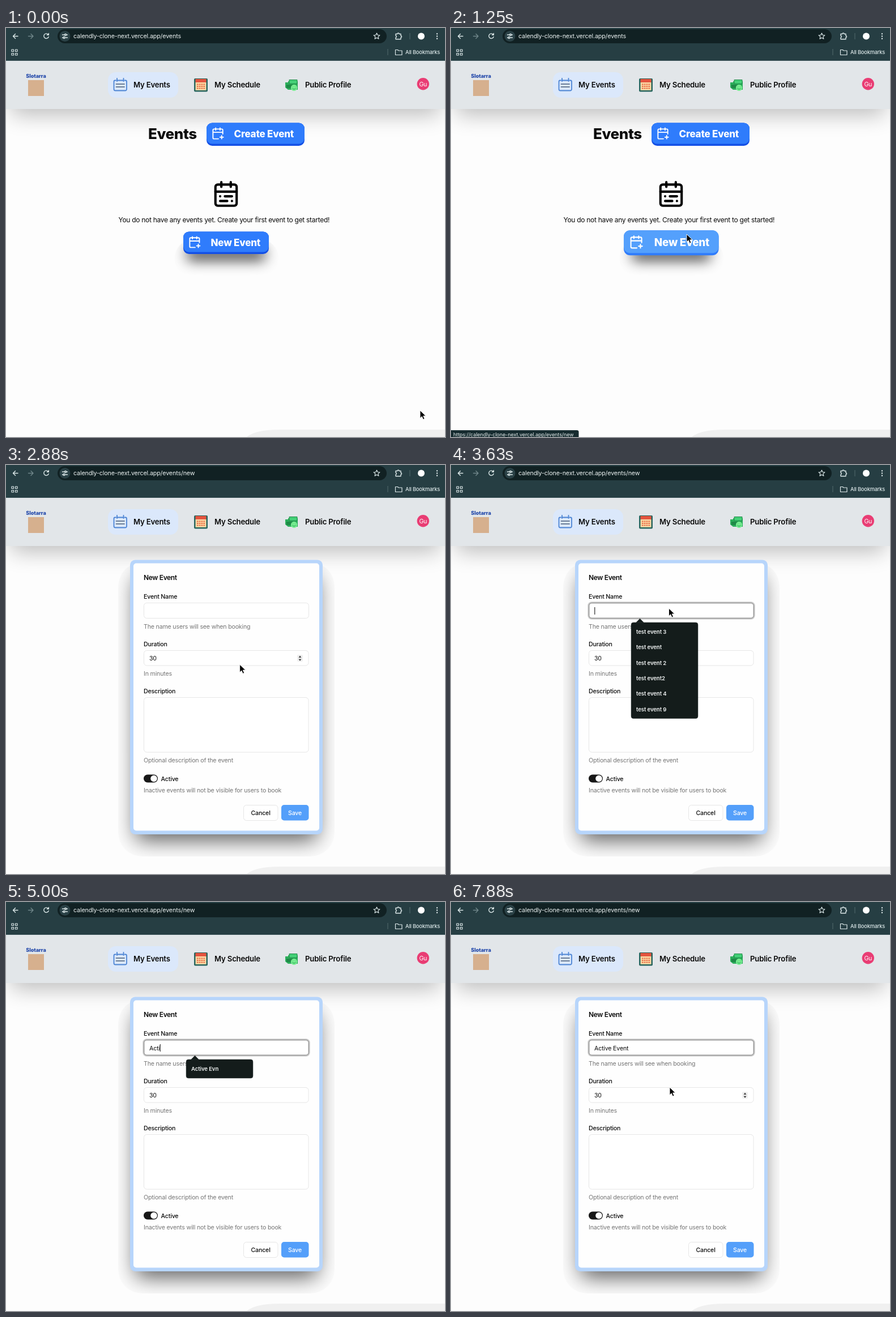
Write an HTML page that moves like this. It is 775 by 722 pixels and loops after 8 s.

```html
<!DOCTYPE html>
<html lang="en">
<head>
<meta charset="utf-8">
<title>New event form</title>
<style>
  html, body { margin: 0; width: 100%; height: 100%; overflow: hidden; background: #fdfdfd; }
  svg { display: block; width: 100%; height: 100%; }
  text { font-family: Inter, "Noto Sans", sans-serif; font-size: 10.6px; letter-spacing: -.17px; fill: #0a0a0a; white-space: pre; }
  .line { fill: none; stroke: currentColor; stroke-width: 2; stroke-linecap: round; stroke-linejoin: round; }
  .chrome { color: #dbe7e8; }
  .chrome .line { stroke-width: 1.4; }
  .nav text { font-size: 13.2px; font-weight: 600; letter-spacing: -.2px; }
  .button text { font-size: 17px; font-weight: 800; letter-spacing: -.2px; fill: #fff; }
  .button { color: #fff; --face: #2f7cfc; --edge: #1450e6; }
  .button.hover { --face: #54a0fc; --edge: #2f7cfc; }
  .face { fill: var(--face); }
  .edge { fill: var(--edge); }
  .label { font-weight: 500; }
  .muted { fill: #757575; }
  .field { fill: #fff; stroke: #e6e6e6; }
  .menu text { font-size: 9.6px; font-weight: 600; letter-spacing: -.1px; fill: #f2f5f5; }
</style>
</head>
<body>
<svg viewBox="0 0 775 722" preserveAspectRatio="none">
  <defs>
    <filter id="soft" x="-50%" y="-150%" width="200%" height="400%"><feGaussianBlur stdDeviation="19"/></filter>
    <filter id="tight" x="-50%" y="-250%" width="200%" height="600%"><feGaussianBlur stdDeviation="12"/></filter>
    <clipPath id="halo"><rect x="198" y="172" width="382" height="519" rx="42"/></clipPath>
    <clipPath id="buttonHalo"><rect x="297" y="372" width="185" height="72" rx="36"/></clipPath>
    <g id="addIcon" class="line">
      <path d="M21 13V6a2 2 0 0 0-2-2H5a2 2 0 0 0-2 2v14a2 2 0 0 0 2 2h8M16 2v4M8 2v4M3 10h18M16 19h6M19 16v6"/>
    </g>
  </defs>

  <rect width="775" height="722" fill="#fdfdfd"/>
  <path d="M425 722Q440 709 485 709H775V722Z" fill="#f0f0f0"/>
  <rect x="9" y="80" width="757" height="73" opacity=".26" filter="url(#soft)"/>

  <!-- Browser bars -->
  <g class="chrome">
    <rect width="775" height="58" fill="#263e43"/>
    <rect y="57" width="775" height="1" fill="#3a5257"/>
    <rect x="91" y="2" width="581" height="25" rx="12.5" fill="#112123"/>
    <circle cx="104" cy="14.500" r="9.500" fill="#2a4146"/>
    <path class="line" d="M21 14.500H13M16.500 10.500l-4 4 4 4M99.500 12h3M107 12h1.500M99.500 17h1M105 17h3.500"/>
    <circle class="line" cx="105" cy="12" r="1.500"/><circle class="line" cx="102.500" cy="17" r="1.500"/>
    <path class="line" d="M39.500 14.500h8M44 10.500l4 4-4 4" stroke="#70868a" style="stroke:#70868a"/>
    <path class="line" d="M74.500 11.500a4.300 4.300 0 1 0 .7 4M75.300 9.500v2.800h-2.800"/>
    <path class="line" style="stroke-width:1.200" d="M654.500 9l1.600 3.500 3.800.4-2.900 2.500.9 3.800-3.400-2-3.400 2 .9-3.800-2.900-2.500 3.800-.4z"/>
    <path class="line" d="M688 10.500h3a1.500 1.500 0 0 1 3 0h3v3.200a1.500 1.500 0 0 1 0 3v3h-9v-2.700a1.800 1.800 0 0 0 0-3.500z"/>
    <path d="M713 9v11M674 37v11" stroke="#526a6e"/>
    <circle cx="733" cy="14.500" r="6" fill="#fff"/>
    <path class="line" style="stroke-width:2.400" d="M761 10.200h.01M761 14.500h.01M761 18.800h.01"/>
    <path class="line" d="M10 38h3.500v3.500h-3.500zM16.500 38h3.500v3.500h-3.500zM10 44.500h3.500v3.500h-3.500zM16.500 44.500h3.500v3.500h-3.500z" style="stroke-width:1.200"/>
    <path class="line" style="stroke-width:1.200" d="M687.500 38.500h4l1.500 1.500h6v7.500h-11.500z"/>
    <text id="url" x="119" y="18" style="font-size:10.700px;letter-spacing:-.13px;fill:#eef4f4"></text>
    <text x="705" y="45.500" style="font-size:9.300px;letter-spacing:-.2px;font-weight:500;fill:#dbe7e8">All Bookmarks</text>
  </g>

  <!-- Site header -->
  <rect y="58" width="775" height="85" fill="#e2e6e9"/>
  <text x="53" y="88" text-anchor="middle" style="font-size:9px;font-weight:800;letter-spacing:0;fill:#1c43a8">Slotarra</text>
  <rect x="39" y="92" width="28" height="28" fill="#d6b08e"/>
  <g class="nav">
    <rect x="180" y="78" width="124" height="45" rx="14" fill="#dbe8fb"/>
    <g class="line" stroke-width="2">
      <path d="M194 92.500h-1.500a2 2 0 0 0-2 2v13.500a2.500 2.500 0 0 0 2.500 2.500h17.500a2.500 2.500 0 0 0 2.500-2.500v-13.500a2 2 0 0 0-2-2h-1.500M197.500 92.500h8.500M196 89v5M207.500 89v5" style="stroke:#4c84d4;stroke-width:1.800"/>
      <path d="M194.500 99h14.500M194.500 104h14.500" style="stroke:#6d7f96;stroke-width:1.800"/>
    </g>
    <text x="225" y="105">My Events</text>
    <rect x="332" y="89" width="24" height="23.500" rx="2" fill="#28665f"/>
    <rect x="334.500" y="90" width="19" height="6" fill="#e4533e"/>
    <rect x="334.500" y="96" width="19" height="14" fill="#fbd9a5"/>
    <path d="M337 99.500h14M337 103h14M337 106.500h14" stroke="#ea6b45" stroke-width="2" stroke-dasharray="2.600 1.200"/>
    <text x="368" y="105">My Schedule</text>
    <path d="M493 96h5v-2h17v15h-17l-5-4z" fill="#2cae5b"/>
    <path d="M500 91.500h14v7h-14z" fill="#43cf76" stroke="#1e8a47"/>
    <path d="M495 100h11v6h-11z" fill="#1e8a47"/>
    <circle cx="508.500" cy="105.500" r="5.500" fill="#79ee92"/>
    <path class="line" d="M506.500 104h.01M510.500 104h.01M506 107q2.500 2 5 0" style="stroke:#27a657;stroke-width:1.200"/>
    <text x="528" y="105">Public Profile</text>
  </g>
  <circle cx="736.300" cy="98.700" r="10.700" fill="#e93d74"/>
  <text x="736.300" y="102.500" text-anchor="middle" style="fill:#fff">Gu</text>

  <!-- Empty list -->
  <g id="listPage">
    <text x="251" y="196" style="font-size:26px;font-weight:800;letter-spacing:-.4px">Events</text>
    <g class="button">
      <rect class="edge" x="354" y="167.500" width="173" height="40.500" rx="10"/>
      <rect class="face" x="354" y="167.500" width="173" height="37" rx="10"/>
      <use href="#addIcon" transform="translate(362.500 174.500) scale(.96)"/>
      <text x="402.500" y="192.500">Create Event</text>
    </g>
    <g class="line" transform="translate(363.500 268) scale(2.080)">
      <rect x="3" y="4" width="18" height="18" rx="2"/>
      <path d="M16 2v4M3 10h18M8 2v4M17 14h-6M13 18H7M7 14h.01M17 18h.01"/>
    </g>
    <text x="198.500" y="343" style="font-size:12px;letter-spacing:-.29px">You do not have any events yet. Create your first event to get started!</text>
    <g clip-path="url(#buttonHalo)"><rect x="320" y="388" width="137" height="22" opacity=".75" filter="url(#tight)"/></g>
    <g id="newButton" class="button">
      <rect class="edge" x="313" y="359.500" width="151" height="39.500" rx="10"/>
      <rect class="face" x="313" y="359.500" width="151" height="36" rx="10"/>
      <use href="#addIcon" transform="translate(321.500 366.500) scale(.95)"/>
      <text x="361.500" y="384.500">New Event</text>
    </g>
  </g>

  <!-- Event form -->
  <g id="formPage">
    <g clip-path="url(#halo)"><rect x="229" y="197" width="320" height="465" opacity=".65" filter="url(#soft)"/></g>
    <rect x="219" y="167.500" width="340" height="484.500" rx="9" fill="#b7d5fb"/>
    <rect x="225" y="173.500" width="328" height="472" rx="5" fill="#fefefe"/>
    <text x="243" y="202.500" style="font-size:12px;font-weight:600;letter-spacing:-.35px">New Event</text>
    <text class="label" x="243" y="236">Event Name</text>
    <text class="muted" x="243" y="288.500">The name users will see when booking</text>
    <text class="label" x="243" y="319.500">Duration</text>
    <text class="muted" x="243" y="372">In minutes</text>
    <text class="label" x="243" y="402.800">Description</text>
    <text class="muted" x="243" y="525">Optional description of the event</text>
    <text class="label" x="273.500" y="557.500">Active</text>
    <text class="muted" x="243" y="578">Inactive events will not be visible for users to book</text>
    <g id="fields">
      <rect class="field" x="243.500" y="243.500" width="291" height="27" rx="5"/>
      <rect class="field" x="243.500" y="327.500" width="290.500" height="26.500" rx="5"/>
      <rect class="field" x="243.500" y="410.500" width="290.500" height="96.500" rx="5"/>
      <rect class="field" x="419.500" y="600.500" width="60.500" height="27" rx="5"/>
    </g>
    <g id="focusRing" fill="none">
      <rect x="243" y="243" width="292" height="28" rx="5.500" stroke="#cbcbcb" stroke-width="3.500"/>
      <rect x="243.500" y="243.500" width="291" height="27" rx="5" stroke="#8f8f8f"/>
    </g>
    <text id="eventName" x="253" y="261.500"></text>
    <rect id="caret" y="251" width="1" height="13"/>
    <text x="253" y="345">30</text>
    <g id="spinner">
      <rect x="514" y="335" width="10" height="12" rx="2" fill="#efefef"/>
      <path d="M516.500 340l2.500-3.500 2.500 3.500zM516.500 342.500l2.500 3.500 2.500-3.500z" fill="#444"/>
    </g>
    <rect x="243" y="546.500" width="25" height="14" rx="7" fill="#171717"/>
    <circle cx="261" cy="553.500" r="5.800" fill="#fff"/>
    <text class="label" x="432.500" y="617.500">Cancel</text>
    <rect x="486" y="600" width="48.500" height="27.500" rx="5" fill="#549ffa"/>
    <text class="label" x="498" y="617.500" style="fill:#fff">Save</text>
    <g id="menu" class="menu">
      <path d="M326 278.500l7.500-7.500 7.500 7.500z" fill="#141c1b"/>
      <rect id="menuBox" x="318" y="278" width="118" rx="4" fill="#141c1b" stroke="#3a4140" stroke-width=".5"/>
      <g id="menuItems"></g>
    </g>
  </g>

  <g id="status">
    <path d="M0 710H222q3.500 0 3.500 3V722H0z" fill="#172c30"/>
    <text x="4" y="721" style="font-size:9px;letter-spacing:-.06px;fill:#e6eeee">https://calendly-clone-next.vercel.app/events/new</text>
  </g>
  <path id="cursor" d="M0 0V13.800l3.200-3 2.300 5.300 2.500-1.100-2.300-5.100h4.500z" stroke="#fff" stroke-width=".9"/>
</svg>
<script>
const LOOP = 8000;
const $ = id => document.getElementById(id);
const show = (id, on) => { $(id).style.display = on ? '' : 'none'; };
const within = (t, from, to) => t >= from && t < to;
const ease = p => p < .5 ? 4 * p ** 3 : 1 - (2 - 2 * p) ** 3 / 2;

// Pointer moves: start, end, then the two end points
const moves = [
  [150, 1190, 731, 675, 416, 364],
  [2660, 3400, 416, 364, 384.5, 253],
  [7450, 7860, 384.5, 253, 386, 327]
];
// Time at which each character of the name is typed
const fullName = 'Active Event';
const keyTimes = [4250, 4750, 4875, 5000, 5125, 5250, 6250, 6500, 6625, 6745, 6875, 7000];
const history = ['test event 3', 'test event', 'test event 2', 'test event2', 'test event 4', 'test event 9'];

function pointerAt(t) {
  const [start, end, x0, y0, x1, y1] = moves.findLast(m => t >= m[0]) || moves[0];
  const p = ease(Math.min(1, Math.max(0, (t - start) / (end - start))));
  return [x0 + (x1 - x0) * p, y0 + (y1 - y0) * p];
}

function setMenu(items) {
  const key = items.join();
  if ($('menu').dataset.key === key) return;
  $('menu').dataset.key = key;
  $('menuBox').setAttribute('height', 33 + 27.3 * (items.length - 1));
  $('menuItems').innerHTML = items.map((item, i) =>
    `<text x="327" y="${298 + 27.3 * i}">${item}</text>`).join('');
}

function draw(now) {
  const t = now % LOOP;
  const onForm = t >= 2000;
  const hover = t >= 1120;
  const typed = fullName.slice(0, keyTimes.filter(k => t >= k).length);
  const [x, y] = pointerAt(t);

  $('url').textContent = 'calendly-clone-next.vercel.app/events' + (onForm ? '/new' : '');
  show('listPage', !onForm);
  show('formPage', onForm);
  $('newButton').classList.toggle('hover', hover);
  $('newButton').setAttribute('transform', hover ? 'translate(389 379) scale(1.11) translate(-388.7 -379)' : '');
  show('status', within(t, 1190, 2870));

  $('fields').setAttribute('opacity', t < 2500 ? .3 : 1);
  show('focusRing', t >= 3620);
  show('menu', within(t, 3620, 6745));
  setMenu(typed ? ['Active Evn'] : history);
  $('eventName').textContent = typed;
  $('caret').setAttribute('x', 253 + (typed ? $('eventName').getComputedTextLength() : .3));
  show('caret', within(t, 3620, 4125) || within(t, 4250, 5500) || within(t, 6000, 7495));

  show('spinner', y > 326);
  show('cursor', !within(t, 4250, 7495));
  $('cursor').setAttribute('transform', `translate(${x} ${y})`);
  requestAnimationFrame(draw);
}
draw(performance.now());
</script>
</body>
</html>
```
